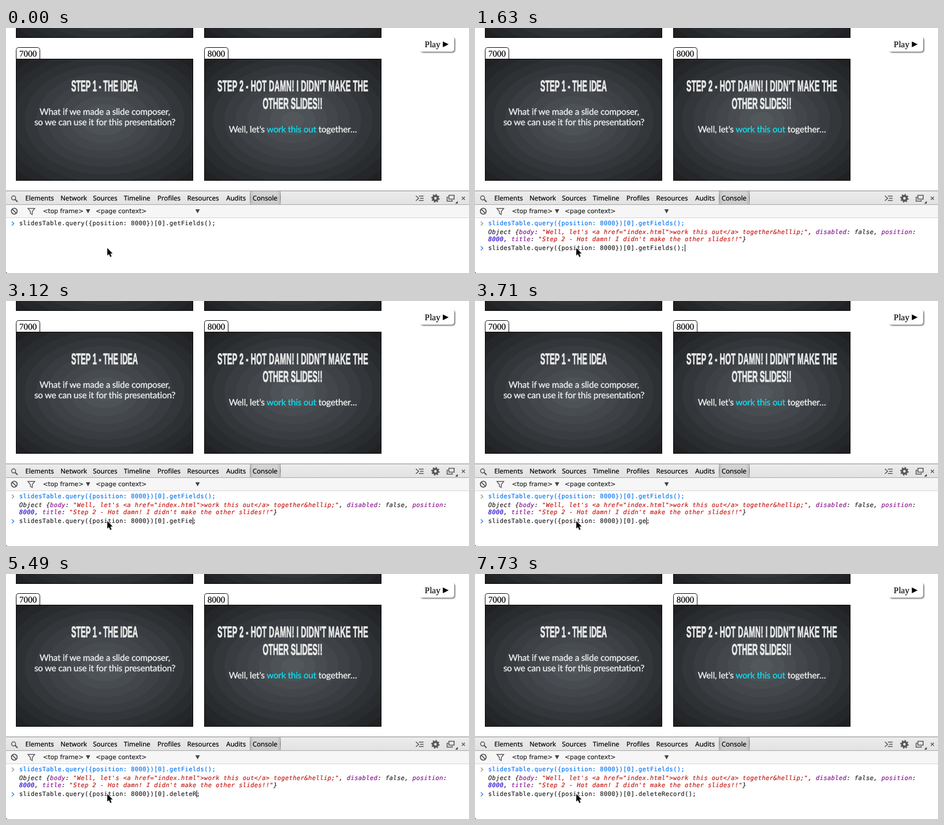
An HTML page for the animation above (8 s loop, 841 px wide and 446 px high).

```html
<!DOCTYPE html>
<html lang="en">
<head>
<meta charset="utf-8">
<title>Console session</title>
<style>
  html, body { margin: 0; width: 100%; height: 100%; overflow: hidden; background: #fff; }
  svg { display: block; width: 841px; height: 446px; text-rendering: geometricPrecision; }
  text { white-space: pre; }
  text, tspan { fill: currentColor; stroke: currentColor; stroke-width: .2; }
  .serif { font: 16px "Liberation Serif", serif; color: #000; }
  .head { font: bold 28px "Liberation Sans", sans-serif; color: #e8e8e8; stroke-width: 1; text-anchor: middle; }
  .body { font: 16px Lato, sans-serif; letter-spacing: -.2px; color: #eee; stroke-width: .35; text-anchor: middle; }
  .link { color: #13daec; stroke-width: .35; }
  .tab { font: 12px "Noto Sans", sans-serif; color: #000; }
  .pick { font: 11.2px "DejaVu Sans", sans-serif; color: #222; }
  .mono { font: 11px "DejaVu Sans Mono", monospace; letter-spacing: .378px; color: #222; }
  .out { font-style: italic; }
  .key { color: #881391; }
  .str { color: #c41a16; }
  .num { color: #1c00cf; }
  .icon { fill: none; stroke: #555; stroke-width: 1.8; }
</style>
</head>
<body>
<svg viewBox="0 0 841 446" xmlns="http://www.w3.org/2000/svg">
  <defs>
    <clipPath id="card"><rect width="322" height="222"/></clipPath>
    <g id="slide">
      <g id="glow" clip-path="url(#card)"></g>
      <rect x=".5" y=".5" width="321" height="221" fill="none" stroke="#000"/>
    </g>
    <linearGradient id="bar" x2="0" y2="1">
      <stop stop-color="#ececec"/><stop offset="1" stop-color="#e2e2e2"/>
    </linearGradient>
    <linearGradient id="edge" x2="0" y2="1">
      <stop stop-opacity="0"/><stop offset=".5" stop-opacity=".4"/><stop offset="1" stop-opacity="0"/>
    </linearGradient>
    <linearGradient id="active">
      <stop stop-opacity=".2"/><stop offset=".12" stop-opacity=".1"/>
      <stop offset=".88" stop-opacity=".1"/><stop offset="1" stop-opacity=".2"/>
    </linearGradient>
    <filter id="soft" x="-20%" y="-30%" width="150%" height="180%">
      <feDropShadow dx="2" dy="2" stdDeviation="1.3" flood-color="#000" flood-opacity=".5"/>
    </filter>
  </defs>
  <rect width="841" height="446" fill="#fff"/>

  <use href="#slide" x="18" y="-204"/>
  <use href="#slide" x="360" y="-204"/>
  <g fill="#fff" stroke="#000">
    <path d="M18.500 57V40.500q0-5 5-5h33q5 0 5 5V57"/>
    <path d="M360.500 57V40.500q0-5 5-5h33q5 0 5 5V57"/>
  </g>
  <use href="#slide" x="18" y="56"/>
  <use href="#slide" x="360" y="56"/>
  <text class="serif" x="24" y="52">7000</text>
  <text class="serif" x="366" y="52">8000</text>

  <text class="head" transform="translate(179 114.500) scale(.482 1)">STEP 1 - THE IDEA</text>
  <text class="body" x="179.500" y="158">What if we made a slide composer,</text>
  <text class="body" x="179.500" y="177">so we can use it for this presentation?</text>
  <text class="head" transform="translate(521 114.500) scale(.482 1)" letter-spacing=".5">STEP 2 - HOT DAMN! I DIDN'T MAKE THE</text>
  <text class="head" transform="translate(520.500 146.500) scale(.482 1)">OTHER SLIDES!!</text>
  <text class="body" x="521" y="190">Well, let's <tspan class="link">work this out</tspan> together…</text>

  <rect x="751" y="15" width="63" height="28" rx="5" fill="#fff" filter="url(#soft)"/>
  <text class="serif" x="760.500" y="35">Play</text>
  <path d="M793.500 24.500L804 29.800L793.500 35Z"/>

  <rect y="296" width="841" height="26" fill="url(#bar)"/>
  <rect x="443" y="297" width="56" height="24" fill="url(#active)"/>
  <rect x="443" y="297" width="1" height="24" fill="url(#edge)"/>
  <rect x="498" y="297" width="1" height="24" fill="url(#edge)"/>
  <path d="M0 296.500H841" stroke="#858585"/>
  <path d="M0 321.500H841" stroke="#a3a3a3"/>
  <rect y="322" width="841" height="23" fill="#f6f6f6"/>
  <path d="M0 345.500H841" stroke="#d4d4d4"/>
  <g id="tabs"></g>

  <g class="icon">
    <circle cx="13.800" cy="309.300" r="3.700" stroke-width="1.500"/>
    <path d="M16.500 312L21 316.500" stroke-width="2.200"/>
    <circle cx="15" cy="333.500" r="5.300"/>
    <path d="M11.300 329.800L18.700 337.200"/>
    <path d="M39.800 328.500H52.200L47.700 334V339.500L44.300 337.500V334Z" stroke-width="1.400"/>
    <path d="M744.500 305.500L749.500 310L744.500 314.500" stroke-width="1.600"/>
    <path d="M750 306H758.500M752 310H758.500M750 314H758.500" stroke-width="1.500"/>
    <circle cx="780" cy="310" r="4.200" stroke-width="3.600"/>
    <circle cx="780" cy="310" r="6.600" stroke-width="2.200" stroke-dasharray="2.592"/>
    <path d="M804.500 304.500H814V311.500H804.500Z" stroke-width="1.600"/>
    <path d="M803.500 308H801.300V315.300H810.500V313" stroke-width="1.500"/>
    <path d="M828 307.200L833.600 312.800M833.600 307.200L828 312.800" stroke-width="1.400"/>
  </g>
  <path d="M820.500 315V319.500H816Z" fill="#333"/>
  <text class="pick" x="67" y="337">&lt;top frame&gt;</text>
  <text class="pick" x="163" y="337">&lt;page context&gt;</text>
  <path d="M145 330h8l-4 7.500zM344 330h8l-4 7.500z" fill="#444"/>

  <path id="mark" d="M10.500 352.500L14.300 356L10.500 359.500" fill="none" stroke-width="1.500"/>
  <text id="first" class="mono" x="24" y="359">slidesTable.query({position: 8000})[0].getFields();</text>
  <g id="reply">
    <text class="mono out" x="24" y="375">Object {<tspan class="key">body</tspan>: <tspan class="str">"Well, let's &lt;a href="index.html"&gt;work this out&lt;/a&gt; together&amp;hellip;"</tspan>, <tspan class="key">disabled</tspan>: false, <tspan class="key">position</tspan>:</text>
    <text class="mono out" x="24" y="388"><tspan class="num">8000</tspan>, <tspan class="key">title</tspan>: <tspan class="str">"Step 2 - Hot damn! I didn't make the other slides!!"</tspan>}</text>
    <path d="M10.500 397.500L14.300 401L10.500 404.500" fill="none" stroke="#2f86ea" stroke-width="1.500"/>
    <text id="entry" class="mono" x="24" y="404"></text>
  </g>
  <rect id="caret" width="1" height="13" fill="#000"/>

  <path d="M184 400.500V414.200L187 411.400L189.300 416.800L191.800 415.700L189.500 410.400H193.700Z" stroke="#fff" stroke-width="1.600" paint-order="stroke"/>
  <path d="M0 443V446H3Q0 446 0 443Z"/>
</svg>
<script>
const $ = id => document.getElementById(id);
const LOOP = 8000, TICK = 147.5, CELL = 7, LEFT = 24;

// Banded glow behind every slide
const BANDS = 11;
const shade = f => `rgb(${[[85, 28], [90, 30], [95, 32]].map(([a, b]) => Math.round(a + (b - a) * f))})`;
let rings = "";
for (let i = BANDS; i > 0; i--) {
  const f = i / BANDS;
  rings += `<ellipse cx="161" cy="111" rx="${228 * f}" ry="${157 * f}" fill="${shade((i - .5) / BANDS)}"/>`;
}
$("glow").innerHTML = rings;

const tabs = { Elements: 35, Network: 99, Sources: 158, Timeline: 214, Profiles: 275, Resources: 329, Audits: 400, Console: 448 };
$("tabs").innerHTML = Object.entries(tabs)
  .map(([name, x]) => `<text class="tab" x="${x}" y="314">${name}</text>`).join("");

// Editing steps: time, text before the caret, text after it, caret shown
const PREFIX = "slidesTable.query({position: 8000})[0].";
const OLD = "getFields()", NEW = "deleteRecord()";
const steps = [];
const add = (time, before, after = ";", caret = true) => steps.push({ time, before, after, caret });
const edit = (time, call, from, to) => {
  const dir = Math.sign(to - from) || 1;
  for (let n = from, k = 0; n !== to + dir; n += dir, k++)
    add(time + k * TICK, PREFIX + call.slice(0, n));
};

add(440, "", "");
add(890, "", "", false);
add(1480, "", "");
add(1630, PREFIX + OLD + ";", "");
add(2080, PREFIX + OLD);
edit(2530, OLD, 10, 3);
edit(3710, OLD, 2, 1);
add(4300, PREFIX);
edit(4750, NEW, 2, 7);
edit(5790, NEW, 8, 11);
edit(6540, NEW, 12, 12);
add(6980, PREFIX + NEW.slice(0, 12), ";", false);
edit(7130, NEW, 13, 14);
add(7730, PREFIX + NEW, ";", false);

function draw(t) {
  const sent = t >= 440;
  $("reply").style.display = sent ? "" : "none";
  $("first").style.color = sent ? "#0a74f0" : "#222";
  $("mark").style.stroke = sent ? "#999" : "#2f86ea";

  let col = 51, shown = t >= 300;
  if (sent) {
    const now = steps.filter(s => s.time <= t).pop();
    $("entry").textContent = now.before + now.after;
    col = now.before.length;
    shown = now.caret;
  }
  $("caret").setAttribute("x", LEFT + col * CELL);
  $("caret").setAttribute("y", sent ? 394 : 349);
  $("caret").style.display = shown ? "" : "none";
}

const start = performance.now();
function tick() {
  draw((performance.now() - start) % LOOP);
  requestAnimationFrame(tick);
}
tick();
</script>
</body>
</html>
```
